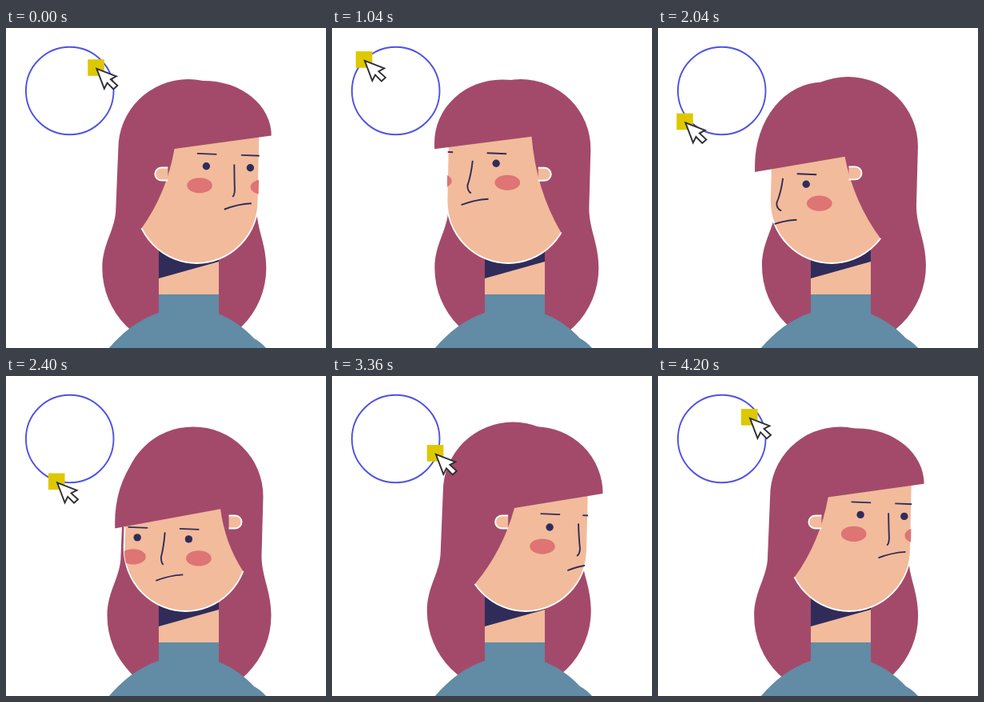
Animation, 400 px wide and 400 px high, one loop 4.24 s. Source, as an HTML page with a canvas:

```html
<!DOCTYPE html>
<html lang="en">
<head>
<meta charset="utf-8">
<title>Following the cursor</title>
<style>
html, body { margin: 0; width: 100%; height: 100%; overflow: hidden; background: #fff; }
canvas { display: block; width: 400px; height: 400px; }
</style>
</head>
<body>
<canvas id="stage"></canvas>
<script>
const LOOP = 4240, STEP = 40;
const HAIR = '#a34a6a', SKIN = '#f2bb9c', BLUSH = '#de7474', INK = '#302c5a';
const SWEATER = '#628ba6', RING = '#4f52e2', YELLOW = '#dec800', WHITE = '#fff';

const canvas = document.getElementById('stage');
const ctx = canvas.getContext('2d');
const dpr = window.devicePixelRatio || 1;
canvas.width = canvas.height = 400 * dpr;

// The hand-drawn lap around the ring: time, angle in degrees, distance
const lap = [
  { t: 0, angle: 37.3, dist: 47.8 },
  { t: 600, angle: 93.5, dist: 49.1 },
  { t: 1560, angle: 176.4, dist: 55.6 },
  { t: 2040, angle: 223.2, dist: 56.2 },
  { t: 2800, angle: 295.6, dist: 53.2 },
  { t: 3360, angle: 341.8, dist: 57.4 }
];

// Periodic cubic Hermite curve; each lap adds `turn` to the value
function along(key, t, turn) {
  const n = lap.length;
  const wraps = i => Math.floor(i / n);
  const at = i => lap[(i + n) % n].t + wraps(i) * LOOP;
  const val = i => lap[(i + n) % n][key] + wraps(i) * turn;
  const slope = i => (val(i + 1) - val(i - 1)) / (at(i + 1) - at(i - 1));
  let i = n - 1;
  while (at(i) > t) i--;
  const d = at(i + 1) - at(i), k = (t - at(i)) / d, k2 = k * k, k3 = k2 * k;
  return (2 * k3 - 3 * k2 + 1) * val(i) + (k3 - 2 * k2 + k) * d * slope(i) +
    (3 * k2 - 2 * k3) * val(i + 1) + (k3 - k2) * d * slope(i + 1);
}

// The head pose follows from the direction of the cursor
function pose(t) {
  const a = along('angle', t, 360) * Math.PI / 180, dist = along('dist', t, 0);
  const c = Math.cos(a), s = Math.sin(a), c2 = Math.cos(2 * a), s2 = Math.sin(2 * a);
  const turn = 1.7 + 77 * c + 2 * s - 6 * s2;
  const nod = 17.5 - 18.5 * s + 2.5 * c - 2 * c2;
  const lift = -6.7 - 4 * c2 + 3 * s + s2;
  const frontX = 227 + .35 * turn;
  const fringe = 139.5 + nod + .25 * lift, slope = .125 + .0016 * nod;
  return {
    x: 74.5 + dist * c, y: 78.5 - dist * s,
    turn, nod, lift, frontX, fringe,
    top: 69 + lift + .24 * nod,
    lineY: x => fringe - (x - frontX) * slope
  };
}

function shape(draw, fill, stroke, width = 1.9) {
  ctx.beginPath();
  draw();
  if (fill) { ctx.fillStyle = fill; ctx.fill(); }
  if (stroke) { ctx.strokeStyle = stroke; ctx.lineWidth = width; ctx.stroke(); }
}

function poly(pts) {
  pts.forEach(([x, y]) => ctx.lineTo(x, y));
  ctx.closePath();
}

const oval = (x, y, rx, ry, fill) =>
  shape(() => ctx.ellipse(x, y, rx, ry, 0, 0, Math.PI * 2), fill);

function backHair(p) {
  ctx.save();
  ctx.translate(-.08 * p.turn, p.lift);
  shape(() => {
    ctx.moveTo(142, 230);
    ctx.lineTo(145, 156);
    ctx.ellipse(232.5, 156, 87.5, 87, 0, Math.PI, 0);
    ctx.lineTo(318, 230);
    ctx.bezierCurveTo(318, 257, 330, 274, 330, 305);
    ctx.arc(227.5, 305, 102.5, 0, Math.PI);
    ctx.bezierCurveTo(125, 274, 142, 257, 142, 230);
  }, HAIR);
  ctx.restore();
}

function body() {
  ctx.fillStyle = SKIN;
  ctx.fillRect(191, 240, 75, 96);
  shape(() => poly([[191, 240], [266, 240], [266, 292], [191, 313]]), INK);
  shape(() => {
    ctx.moveTo(191, 333);
    ctx.lineTo(266, 333);
    ctx.lineTo(266, 357.5);
    ctx.bezierCurveTo(283, 364, 299, 376, 310, 388);
    ctx.quadraticCurveTo(318, 392, 326, 401);
    ctx.lineTo(128, 401);
    ctx.bezierCurveTo(145, 381, 166, 364, 191, 356);
  }, SWEATER);
}

// Rounded ear; side -1 points left, 1 points right
function ear(tip, y, side) {
  shape(() => {
    ctx.moveTo(tip - side * 17, y - 8);
    ctx.lineTo(tip - side * 9, y - 8);
    ctx.arc(tip - side * 9, y, 8, -Math.PI / 2, Math.PI / 2, side < 0);
    ctx.lineTo(tip - side * 17, y + 8);
  }, SKIN, WHITE);
}

function facePath(cx, top) {
  ctx.moveTo(cx - 75, top);
  ctx.lineTo(cx - 77, 215);
  ctx.ellipse(cx, 215, 77, 79, 0, Math.PI, 0, true);
  ctx.lineTo(cx + 79, top);
  ctx.closePath();
}

// Hair over one side of the face, from the fringe down to the jaw at height ey
function sidePanel(p, cx, top, ax, ey, side) {
  if ((ax - cx) * side >= 77) return;
  const ay = p.lineY(ax);
  const h = Math.max(0, (ey - 215) / 79);
  const ex = cx + side * 77 * Math.sqrt(1 - h * h);
  const bow = Math.min(13, Math.max(0, ey - ay) * .11);
  const out = cx + side * 81;
  shape(() => {
    ctx.moveTo(ax, top - 3);
    ctx.lineTo(ax, ay);
    ctx.quadraticCurveTo((ax + ex) / 2 - side * bow, (ay + ey) / 2 + bow / 2, ex, ey);
    ctx.lineTo(out, ey);
    ctx.lineTo(out, top - 3);
  }, HAIR);
}

function features(p, cx, top) {
  const u = p.turn, eye = 165 + p.nod;
  const left = 185 + 1.12 * u, right = 247 + u;
  const brow = 13 + .05 * Math.max(0, u);
  ctx.save();
  ctx.beginPath();
  facePath(cx, top);
  ctx.clip();
  oval(179 + 1.08 * u, eye + 24, 15.8, 9.6, BLUSH);
  oval(259 + u + .0012 * u * u, eye + 26, 15.8, 9.6, BLUSH);
  [[left, eye], [right, eye + 2]].forEach(([x, y]) => {
    oval(x, y, 4.7, 4.7, INK);
    shape(() => {
      ctx.moveTo(x - 11.5, y - brow);
      ctx.lineTo(x + 13, y - brow + 1);
    }, null, INK);
  });
  const mx = 208 + 1.11 * u, my = eye + 54;
  shape(() => {
    ctx.moveTo(mx, my);
    ctx.quadraticCurveTo(mx + 16, my - 6.5, mx + 34, my - 7.5);
  }, null, INK);
  ctx.restore();

  const nx = 217 + u * (u > 0 ? 1.17 : .985), ny = 164 + .85 * p.nod;
  const bulge = .07 * u - 3.5;
  shape(() => {
    ctx.moveTo(nx, ny);
    ctx.quadraticCurveTo(nx + bulge * .3, ny + 18, nx + bulge, ny + 31);
    ctx.quadraticCurveTo(nx + bulge, ny + 38, nx - 2, ny + 40.5);
  }, null, INK);
}

function fringe(p) {
  const cx = p.frontX, r = 84.3;
  const ly = p.lineY(cx - r), ry = p.lineY(cx + r), side = ly - 8;
  shape(() => {
    ctx.moveTo(cx - r, ly);
    ctx.lineTo(cx - r, side);
    ctx.ellipse(cx, side, r, side - p.top, 0, Math.PI, Math.PI * 1.5);
    ctx.ellipse(cx, ry, r, ry - p.top, 0, Math.PI * 1.5, Math.PI * 2);
  }, HAIR);
}

function head(p) {
  const u = p.turn, cx = 228 + .18 * u, top = p.fringe - 25;
  const toRight = Math.max(0, u), toLeft = Math.max(0, -u);
  const earL = u > 0 ? 144 + .55 * u + .0027 * u * u : cx - 77 - Math.max(0, 7 + .2 * u);
  const earR = u < 0 ? 311 + .8 * u - .0016 * u * u : cx + 77 + Math.max(0, 6 - .1 * u);
  const earRY = 185 + .45 * p.lift;
  const jawL = 170 + 91 * Math.pow(toRight / 80, .4);
  const jawR = 213 + 54 * Math.pow(toLeft / 75, .4) - 1.5 * toRight;
  const frontL = u > 10, frontR = u <= 4;

  if (!frontL && u > -35) ear(earL, 182.5, -1);
  if (!frontR && u < 60) ear(earR, earRY, 1);
  shape(() => facePath(cx, top), SKIN, WHITE);
  features(p, cx, top);
  sidePanel(p, cx, top, 158 + .9 * u, jawL, -1);
  sidePanel(p, cx, top, 283 + .8 * u, jawR, 1);
  if (frontL) ear(earL, 182.5, -1);
  if (frontR) ear(earR, earRY, 1);
  fringe(p);
}

function pointer(x, y) {
  ctx.fillStyle = YELLOW;
  ctx.fillRect(x - 10.3, y - 10.3, 20.6, 20.6);
  ctx.save();
  ctx.translate(x + .8, y + 1.4);
  shape(() => poly([[0, 0], [24.5, 9.5], [17.5, 13.2], [26, 21], [21, 25.5], [13.2, 17.6], [9.5, 25]]),
    WHITE, '#2e2e33');
  ctx.restore();
}

function render(t) {
  const p = pose(t);
  ctx.setTransform(dpr, 0, 0, dpr, 0, 0);
  ctx.fillStyle = WHITE;
  ctx.fillRect(0, 0, 400, 400);
  backHair(p);
  body();
  head(p);
  shape(() => ctx.arc(79.7, 78.5, 54.8, 0, Math.PI * 2), null, RING);
  pointer(p.x, p.y);
}

const start = performance.now();
function tick() {
  const t = (performance.now() - start) % LOOP;
  render(Math.floor(t / STEP) * STEP);
  requestAnimationFrame(tick);
}
tick();
</script>
</body>
</html>
```
